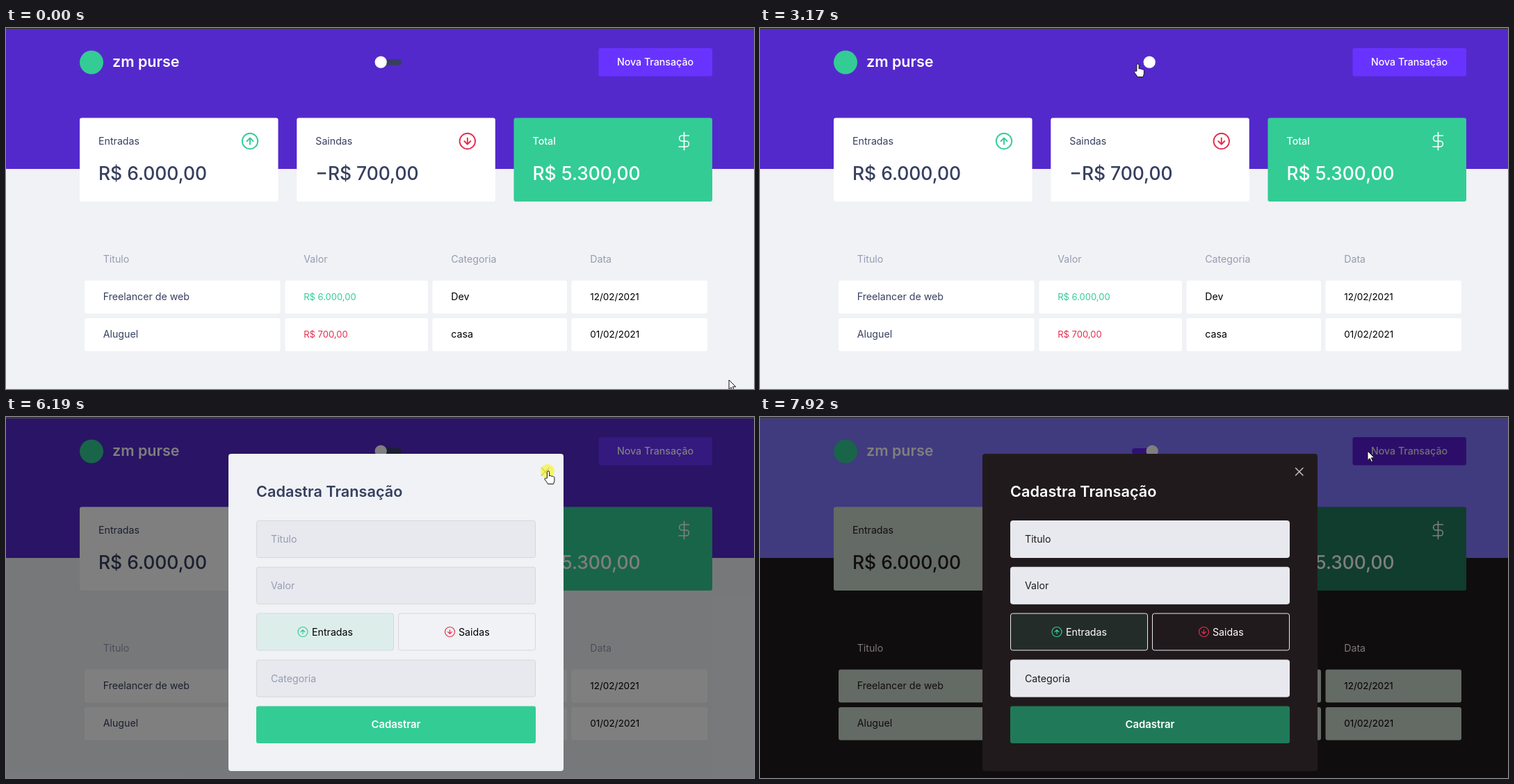
An HTML page for the animation above (7990 ms loop, 1076x520 px).

```html
<!DOCTYPE html>
<html lang="pt-BR">
<head>
<meta charset="utf-8">
<title>Painel de finanças</title>
<style>
html, body { margin: 0; width: 100%; height: 100%; overflow: hidden; }
svg {
  display: block; width: 100%; height: 100%;
  font: 400 14.2px Inter, "Open Sans", sans-serif;
  --head: #5429cc; --bg: #f0f2f5; --card: #fff; --ink: #363f5f; --muted: #969cb2;
  --total: #33cc95; --btn: #6933ff; --gain: #33cc95; --title: #363f5f;
  --hint: #969cb2; --line: #d7d7d7; --option: #000; --picked: #ddeeea; --cross: #969cb2;
}
svg.dark {
  --head: #8075ff; --bg: #211a1d; --card: #cad5ca; --ink: #211a1d; --muted: #f8f0fb;
  --total: #207a5a; --btn: #6320ee; --gain: #207a5a; --title: #fff;
  --hint: #211a1d; --line: #e7e9ee; --option: #fff; --picked: #232c29; --cross: #c4c0c4;
}
.money { font-size: 26.4px; font-weight: 500; }
.small { font-size: 13px; }
.date { font-size: 13.5px; }
.bold { font-weight: 600; }
.icon { fill: none; stroke-linecap: round; stroke-linejoin: round; }
</style>
</head>
<body>
<script>
const LOOP = 7990;
const GREEN = '#33cc95', RED = '#e52e4d';

const box = (x, y, w, h, fill, r = 3, extra = '') =>
  `<rect x="${x}" y="${y}" width="${w}" height="${h}" rx="${r}" fill="${fill}" ${extra}/>`;
const text = (x, y, s, fill, extra = '') => `<text x="${x}" y="${y}" fill="${fill}" ${extra}>${s}</text>`;
const icon = (x, y, scale, color, width, d) =>
  `<path class="icon" transform="translate(${x} ${y}) scale(${scale})" stroke="${color}" stroke-width="${width}" d="${d}"/>`;
const ring = 'M-10 0a10 10 0 1 0 20 0a10 10 0 1 0 -20 0';
const up = (x, y, s) => icon(x, y, s, GREEN, 1.7, ring + 'M0 4V-4M-4 0L0-4L4 0');
const down = (x, y, s) => icon(x, y, s, RED, 1.7, ring + 'M0-4V4M-4 0L0 4L4 0');
const middle = 'text-anchor="middle"';

const card = (x, label, amount, fill, ink, mark, weight = 400) =>
  box(x, 129.5, 285.5, 120.5, fill) +
  text(x + 27, 168, label, ink, `font-weight="${weight}"`) +
  text(x + 27, 219, amount, ink, 'class="money"') + mark;

const cols = [[113, 281.5], [401.5, 205.5], [613.5, 193.5], [813.5, 195.5]];
const styles = ['', 'small', '', 'date'];
const row = (y, cells, inks) => cols.map(([x, w], i) =>
  box(x, y, w, 47.5, 'var(--card)') +
  text(x + 26.7, y + 28, cells[i], inks[i], `class="${styles[i]}"`)).join('');

const border = 'stroke="var(--line)" stroke-width="1"';
const field = (y, label) =>
  box(360.5, y, 401, 53, '#e7e9ee', 3, border) + text(381, y + 31.5, label, 'var(--hint)');

document.body.innerHTML = `<svg viewBox="0 0 1076 520" preserveAspectRatio="none">
${box(0, 0, 1076, 520, 'var(--bg)', 0)}
${box(0, 0, 1076, 203, 'var(--head)', 0)}
<circle cx="123" cy="49.5" r="17" fill="${GREEN}"/>
${text(153, 56, 'zm purse', '#fff', 'class="bold" font-size="21.5"')}
${box(535, 45, 34, 8.5, '', 4, 'id="track"')}
<circle id="knob" cy="49.2" r="8.6" fill="#fff"/>
<g id="create">${box(852.5, 29, 163.5, 40.5, 'var(--btn)')}
${text(934, 54, 'Nova Transação', '#fff', `${middle} font-weight="500"`)}</g>
${card(106, 'Entradas', 'R$ 6.000,00', 'var(--card)', 'var(--ink)', up(351, 163, 1.12))}
${card(418.3, 'Saindas', '−R$ 700,00', 'var(--card)', 'var(--ink)', down(663.8, 163, 1.12))}
${card(730.5, 'Total', 'R$ 5.300,00', 'var(--total)', '#fff',
  icon(975.5, 163, 1.15, '#fff', 1.4, 'M0-11V11M6-7H-2.5a3.5 3.5 0 0 0 0 7h5a3.5 3.5 0 0 1 0 7H-6.5'), 500)}
${['Titulo', 'Valor', 'Categoria', 'Data'].map((s, i) => text(cols[i][0] + 26.7, 338, s, 'var(--muted)')).join('')}
${row(363.7, ['Freelancer de web', 'R$ 6.000,00', 'Dev', '12/02/2021'], ['var(--ink)', 'var(--gain)', '#000', '#000'])}
${row(418, ['Aluguel', 'R$ 700,00', 'casa', '01/02/2021'], ['var(--ink)', RED, '#000', '#000'])}
<g id="modal">
${box(0, 0, 1076, 520, 'rgba(0,0,0,.5)', 0)}
${box(320, 53, 482, 457, 'var(--bg)', 4)}
${text(360, 115, 'Cadastra Transação', 'var(--title)', 'class="bold" font-size="21.7"')}
${field(149.5, 'Titulo')}${field(216.3, 'Valor')}${field(350, 'Categoria')}
${box(360.5, 283, 197, 53, 'var(--picked)', 3, border)}
${box(564.5, 283, 197, 53, 'var(--bg)', 3, border)}
${up(427, 309.5, .7)}${text(440, 314.5, 'Entradas', 'var(--option)')}
${down(638.5, 309.5, .7)}${text(651, 314.5, 'Saidas', 'var(--option)')}
${box(360, 416.5, 402, 53.5, 'var(--total)')}
${text(561, 448, 'Cadastrar', '#fff', `class="bold" font-size="14.9" ${middle}`)}
<path id="cross" class="icon" stroke="var(--cross)" stroke-width="1.5" d="M770.5 73.5l10.5 10.5m0-10.5l-10.5 10.5"/>
</g>
${box(0, 0, 1076, 1, '#2b2b2e', 0)}${box(0, 1, 1076, 1.2, '#47454c', 0)}
<circle id="press" r="10" fill="#fbf21c" opacity=".65"/>
<path id="pointer" stroke="#111" stroke-linejoin="round"/>
</svg>`;

const get = id => document.getElementById(id);
const svg = document.querySelector('svg');
const [track, knob, create, modal, cross, press, pointer] =
  ['track', 'knob', 'create', 'modal', 'cross', 'press', 'pointer'].map(get);

const SHAPES = {
  arrow: 'M0 0V13.5L3.2 10.6 5.4 15.6 7.5 14.7 5.4 9.8H9.7Z',
  hand: 'M-1.6 10V1.4a1.6 1.6 0 0 1 3.2 0V7c1-.8 2.3-.6 2.7.4 1-.6 2.2-.3 2.6.6 1-.4 2 .2 2 1.4v4c0 2-1 3-1.4 5.1H-.6C-1.5 16-4 13.6-5 11.8c-.6-1.2.7-2.2 1.8-1.4z',
  beam: 'M-3-8H3M0-8V8M-3 8H3'
};

// start, end, x, y, sideways bend
const moves = [
  [0, 600, 541, 154],
  [730, 1150, 543.5, 52, 38],
  [3240, 3730, 943, 45],
  [4080, 4710, 518, 169],
  [4840, 5650, 785, 68, 105],
  [5710, 5920, 780, 78],
  [6260, 6740, 557, 53],
  [7080, 7360, 848, 50],
  [7430, 7570, 874, 49]
];
const clicks = [[1290, 1500], [3100, 3170], [3870, 3940], [6060, 6260], [6870, 6940], [7720, 7850]];

const clamp = v => Math.max(0, Math.min(1, v));
const within = (t, a, b) => t >= a && t < b;
const slide = (t, start) => t < start ? 0 : clamp((t - start + 40) / 250);
const inside = (x, y, l, t, r, b) => x >= l && x <= r && y >= t && y <= b;
const blend = (from, to, p) => `rgb(${from.map((c, i) => Math.round(c + (to[i] - c) * p))})`;

function locate(t) {
  let x = 1040, y = 507;
  for (const [a, b, toX, toY, bend = 0] of moves) {
    if (t < a) break;
    const u = clamp((t - a) / (b - a)), e = u * u * (3 - 2 * u);
    x += (toX - x) * e + 4 * bend * e * (1 - e);
    y += (toY - y) * e;
  }
  return [x, y];
}

function draw(t) {
  const dark = within(t, 1500, 3170) || t >= 7010;
  const open = within(t, 3940, 6260) || t >= 7850;
  const on = slide(t, 1500) - slide(t, 3170) + slide(t, 7010);
  const [x, y] = locate(t);
  const overCreate = inside(x, y, 852, 29, 1016, 70);

  svg.classList.toggle('dark', dark);
  modal.style.display = open ? '' : 'none';
  cross.style.display = within(t, 3940, 4010) || within(t, 7850, 7920) ? 'none' : '';
  create.style.filter = overCreate ? 'brightness(.9)' : '';
  knob.setAttribute('cx', 539.2 + 25 * on);
  track.setAttribute('fill', blend([54, 63, 95], dark ? [99, 32, 238] : [84, 41, 204], 1 - (1 - on) ** 2));

  let shape = 'arrow';
  if (open) {
    if (inside(x, y, 767, 66, 789, 90)) shape = 'hand';
    else if (inside(x, y, 360, 149, 762, 202)) shape = 'beam';
  } else if (overCreate || inside(x, y, 531, 40, 573, 58)) shape = 'hand';

  pointer.setAttribute('d', SHAPES[shape]);
  pointer.setAttribute('transform', `translate(${x} ${y})`);
  pointer.setAttribute('fill', shape == 'beam' ? 'none' : '#fff');
  press.setAttribute('cx', x - 1);
  press.setAttribute('cy', y);
  press.style.display = clicks.some(([a, b]) => within(t, a, b)) ? '' : 'none';
}

let start;
function tick(now) {
  start ??= now;
  draw((now - start) % LOOP);
  requestAnimationFrame(tick);
}
draw(0);
requestAnimationFrame(tick);
</script>
</body>
</html>
```
